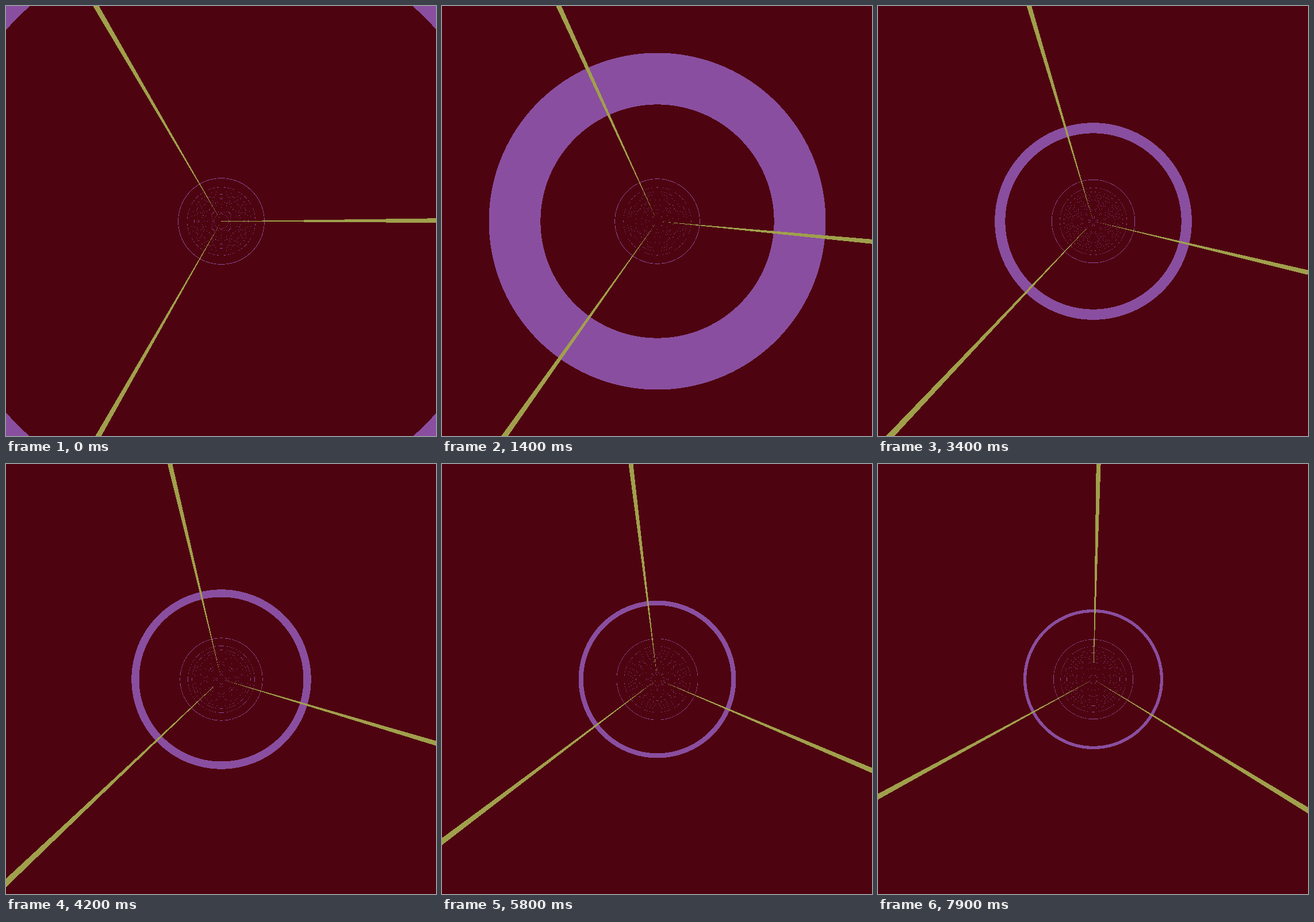
Write an HTML page with a canvas that moves like this. It is 748 px wide and 748 px high and loops after 8000 ms.

```html
<!DOCTYPE html>
<html lang="en">
<head>
<meta charset="utf-8">
<title>Tunnel</title>
<style>
  html, body { margin: 0; width: 100%; height: 100%; overflow: hidden; background: #4e0410; }
  canvas { display: block; width: 748px; height: 748px; }
</style>
</head>
<body>
<canvas id="stage" width="748" height="748"></canvas>
<script>
const SIZE = 748, CENTER = SIZE / 2;
const STEP_MS = 100, STEPS = 80;

// Rings repeat along the tunnel's depth, which falls off with the cube of the radius.
const DEPTH_SCALE = 1.257e8, RING_PERIOD = 303.3, RING_WIDTH = 10;
// Spokes repeat around the axis, in degrees.
const SPOKE_PERIOD = 120, SPOKE_WIDTH = 1.2, TURN_PER_STEP = 0.4;

// Little-endian ABGR pixels.
const rgb = (r, g, b) => (255 << 24 | b << 16 | g << 8 | r) >>> 0;
const WALL = rgb(78, 4, 16), RING = rgb(138, 78, 160), SPOKE = rgb(160, 160, 76);

const ctx = document.getElementById('stage').getContext('2d');
const image = ctx.createImageData(SIZE, SIZE);
const pixels = new Uint32Array(image.data.buffer);
const depth = new Float64Array(SIZE * SIZE);
const angle = new Float64Array(SIZE * SIZE);

for (let y = 0, i = 0; y < SIZE; y++) {
  for (let x = 0; x < SIZE; x++, i++) {
    const dx = x - CENTER, dy = y - CENTER;
    depth[i] = DEPTH_SCALE / Math.hypot(dx, dy) ** 3;
    angle[i] = Math.atan2(-dy, dx) * 180 / Math.PI + 360;
  }
}

function draw(step) {
  const advance = RING_PERIOD + RING_WIDTH - 1 - step;
  const turn = TURN_PER_STEP * (step + 1) + 1e-6;
  for (let i = 0; i < pixels.length; i++) {
    if ((angle[i] + turn) % SPOKE_PERIOD < SPOKE_WIDTH) pixels[i] = SPOKE;
    else if ((depth[i] + advance) % RING_PERIOD < RING_WIDTH) pixels[i] = RING;
    else pixels[i] = WALL;
  }
  ctx.putImageData(image, 0, 0);
}

let shown = -1;
function tick() {
  const step = Math.floor(performance.now() / STEP_MS) % STEPS;
  if (step !== shown) draw(shown = step);
  requestAnimationFrame(tick);
}
tick();
</script>
</body>
</html>
```
